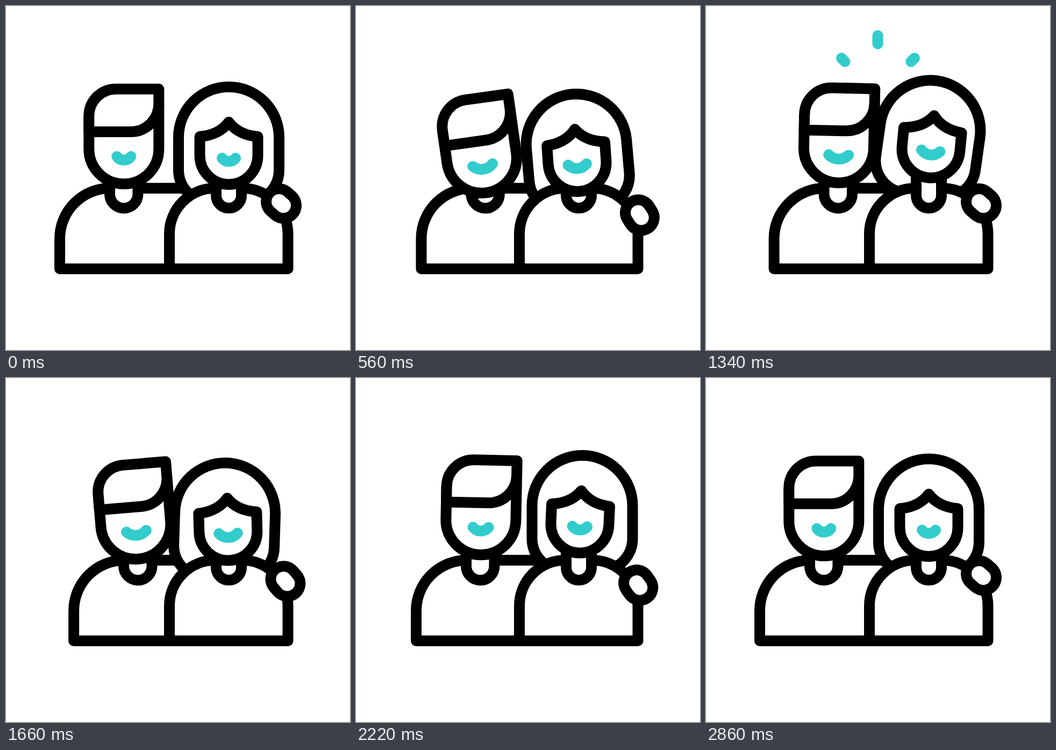
Write an HTML page that moves like this. It is 640 by 640 pixels and loops after 3600 ms.

```html
<!DOCTYPE html>
<html lang="en">
<head>
<meta charset="utf-8">
<title>Couple</title>
<style>
  html, body { margin: 0; width: 100%; height: 100%; overflow: hidden; background: #fff; }
  svg { display: block; width: 100vw; height: 100vh; }
  .line path { fill: #fff; stroke: #000; stroke-width: 20; stroke-linejoin: round; }
  .teal, .line .teal { fill: none; stroke: #3cc; stroke-width: 20; stroke-linecap: round; }
  #hand path { stroke-linecap: round; }
</style>
</head>
<body>
<svg viewBox="0 0 640 640">
  <g class="line">
    <g id="manBody">
      <path d="M100 489V433A94 94 0 0 1 194 339H340V489Z"/>
      <path d="M193 300V350A26.2 26.2 0 0 0 245.4 350V300"/>
    </g>
    <g id="manHead">
      <path d="M-65 -62V0A65 65 0 0 0 65 0V-84"/>
      <path d="M-65 -32H13A52 52 0 0 0 65 -84V-111.5H-15A50 50 0 0 0 -65 -61.5Z"/>
      <path class="teal" id="manMouth"/>
    </g>
    <g id="hair">
      <path d="M-33.5 121A60 60 0 0 1 -93.5 61V0A93.5 93.5 0 0 1 93.5 0V61A60 60 0 0 1 33.5 121"/>
    </g>
    <path d="M304 489V424A85 85 0 0 1 389 339H439.5A85 85 0 0 1 524.5 424V489Z"/>
    <path d="M391 300V352.5A23.5 23.5 0 0 0 438 352.5V300"/>
    <g id="face">
      <path d="M-54 -35V0A54 54 0 0 0 54 0V-35Q18 -38 0 -62Q-18 -38 -54 -35Z"/>
      <path class="teal" id="womanMouth"/>
    </g>
    <g id="hand">
      <path d="M-4 -3.5L4 3.5" style="stroke-width:68"/>
      <path d="M-4 -3.5L4 3.5" style="stroke-width:28;stroke:#fff"/>
    </g>
  </g>
  <path class="teal" id="rays"/>
</svg>
<script>
const LOOP = 3600, STEP = 20, SWING = 1340;
const $ = id => document.getElementById(id);
const mix = (a, b, k) => a + (b - a) * k;
const sine = deg => Math.sin(deg * Math.PI / 180);

function ease(t, from, to) {
  const u = Math.min(1, Math.max(0, (t - from) / (to - from)));
  return u * u * (3 - 2 * u);
}

// Eases from 0 up to 1 at the peak and back to 0.
const bump = (t, from, peak, to) => ease(t, from, peak) - ease(t, peak, to);

function place(id, x, y, turn = 0) {
  $(id).setAttribute("transform", `translate(${x} ${y}) rotate(${turn})`);
}

function smile(id, half, y, depth) {
  const r = (half * half + depth * depth) / (2 * depth);
  $(id).setAttribute("d", `M${-half} ${y}A${r} ${r} 0 0 0 ${half} ${y}`);
}

function drawMan(t, joy, nod) {
  const shift = 26.6 * (ease(t, 0, 780) - ease(t, 1560, 2800));
  const awake = ease(t, 0, 560) - ease(t, 2200, 2700);
  const bow = bump(t, 0, 560, 840), stretch = bump(t, 560, 840, 1340);
  const turn = 1.2 * awake - 9.2 * bow - 5.9 * nod;
  const drop = 19 * bow - 9 * stretch + 8 * nod - 2 * awake;

  place("manBody", shift, 0);
  place("manHead", 219.3 + shift + 50 * sine(turn), 266 + drop, turn);
  smile("manMouth", 13 + 5.5 * joy, 14 - joy, 6.8 + joy);
}

function drawWoman(t, joy, nod) {
  const dip = bump(t, 0, 620, 1340), lift = bump(t, 640, 1340, 1660);
  const rise = bump(t, 1660, 2220, 2860);
  const drop = 13.5 * dip - 12.2 * lift + 7.5 * nod - 6.4 * rise;
  const tilt = -8 * bump(t, 280, 840, 1340) + 5.4 * bump(t, 840, 1340, 1660) - 1.6 * nod + 2.6 * rise;
  const hairTurn = -14.5 * bump(t, 380, 840, 1340) + 8 * bump(t, 840, 1340, 1800);
  const hairShift = -4.5 * dip + 2.5 * lift - 7 * nod + 6.5 * rise;

  place("hair", 414.5 + hairShift, 244 + drop, hairTurn);
  place("face", 414.5 + 43 * sine(tilt), 278 + drop, tilt);
  smile("womanMouth", 12.5 + 4.8 * joy, 5 - 1.5 * joy, 6.2 + 1.6 * joy);
}

// The hand swings out twice.
function drawHand(t) {
  const p = t < 2 * SWING ? sine(180 * t / SWING) ** 2 : 0;
  place("hand", 512 + 17 * p, 367.5 + 23 * p, 17 * p);
}

// Each ray grows toward its tip, then its tail catches up.
function drawRays(t) {
  const head = ease(t, 660, 1240), tail = ease(t, 990, 1550);
  const ray = (x0, y0, x1, y1) =>
    `M${mix(x0, x1, tail)} ${mix(y0, y1, tail)}L${mix(x0, x1, head)} ${mix(y0, y1, head)}`;
  $("rays").setAttribute("d", head > tail
    ? ray(319.5, 104, 319.5, 55) + ray(272.5, 117.5, 252, 97) + ray(367, 117.5, 388, 97)
    : "");
}

function draw(t) {
  const joy = ease(t, 0, 540) - ease(t, 1740, 2460);
  const nod = bump(t, 1340, 1660, 2220);
  drawMan(t, joy, nod);
  drawWoman(t, joy, nod);
  drawHand(t);
  drawRays(t);
}

const start = performance.now();
function tick() {
  const t = (performance.now() - start) % LOOP;
  draw(Math.floor(t / STEP) * STEP);
  requestAnimationFrame(tick);
}
tick();
</script>
</body>
</html>
```
